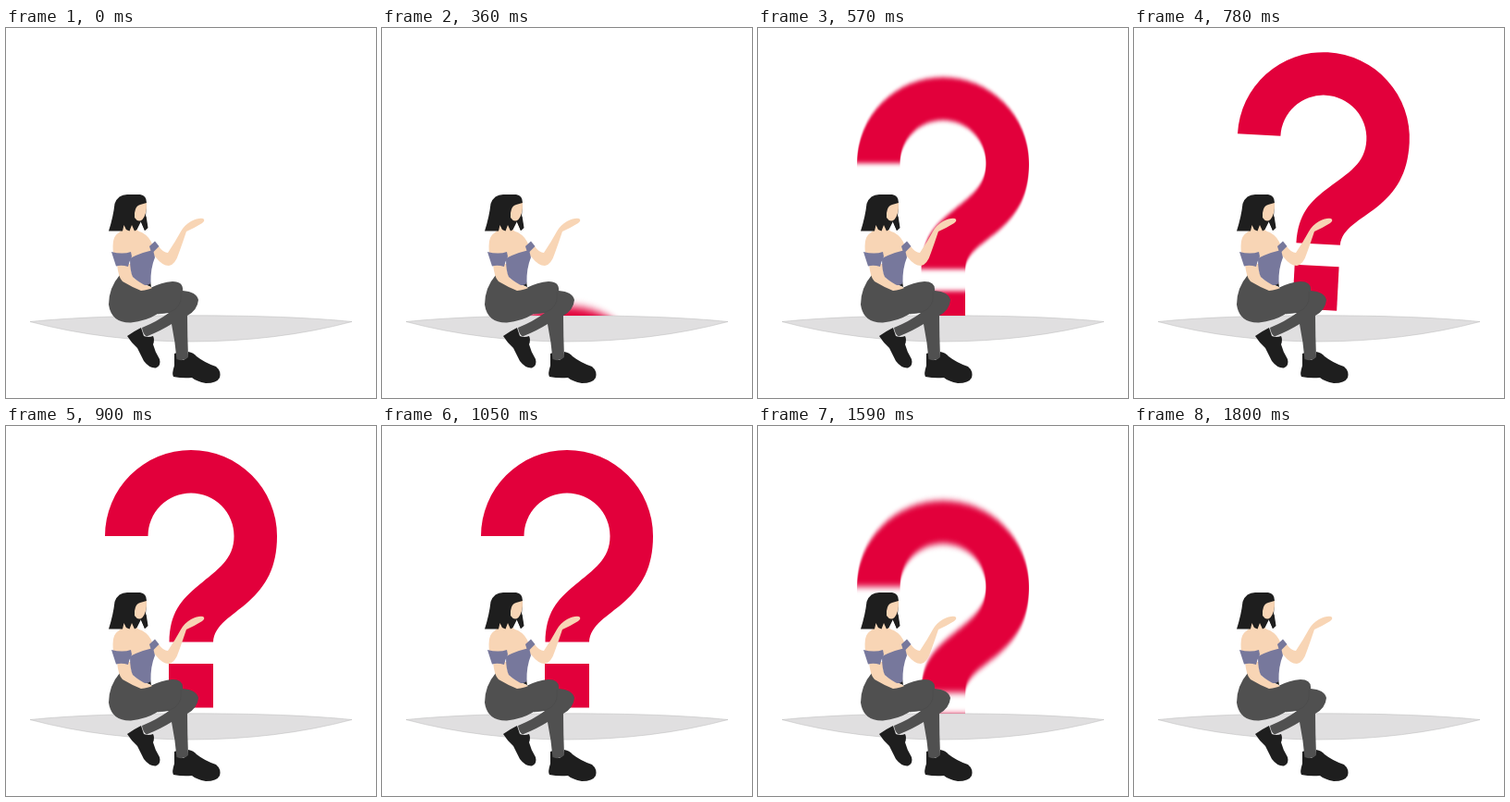
Write an HTML page that moves like this. It is 400 px wide and 400 px high and loops after 2.7 s.

```html
<!DOCTYPE html>
<html lang="en">
<head>
<meta charset="utf-8">
<title>Question</title>
<style>
html, body { margin: 0; width: 100%; height: 100%; overflow: hidden; background: #fff; }
svg { display: block; width: 100%; height: 100%; }
.red { fill: #e2003b; }
.skin { fill: #f8d5b5; }
.top { fill: #77789c; }
.pants { fill: #505050; }
.dark { fill: #1e1e1e; }
</style>
</head>
<body>
<svg viewBox="0 0 400 400">
  <defs>
    <clipPath id="above"><rect width="400" height="311"/></clipPath>
    <filter id="blur" filterUnits="userSpaceOnUse" x="0" y="-20" width="400" height="440" color-interpolation-filters="sRGB">
      <feGaussianBlur id="soft" stdDeviation="0 0"/>
    </filter>
  </defs>

  <path fill="#e0dfe0" stroke="#b8b8b8" stroke-width=".5"
    d="M26 317.5C70 313 130 310.8 200 310.8S330 313 374 317.5C320 332 260 339 200 339S80 332 26 317.5Z"/>

  <g clip-path="url(#above)">
    <g id="lens">
      <g id="mark" class="red">
        <path d="M107 119A93 93 0 0 1 293 119C293 153 281 173 262 190C244 206 225 215 224 233.500H176.500C177 202 189 188 208.500 172C229 155 246.500 144 246.500 119A46.500 46.500 0 0 0 153.500 119Z"/>
        <path d="M176 257H224V304.500H176Z"/>
      </g>
    </g>
  </g>

  <g id="woman">
    <!-- legs and shoes -->
    <path class="dark" d="M131 333Q138 328 146 324L149 333Q154 335 159 333Q161 337 159 342Q161 350 166 358Q168 365 162 367.500Q155 368 149 360Q145 352 142 346Q136 341 131 333Z"/>
    <path class="dark" d="M182 352L185 351Q186 360 191 359Q197 358 197 350Q203 351 206 355Q215 362 227 366Q233 371 231 378Q228 384 216 384Q206 382 201 378Q191 379 181 377Q179 374 182 365Z"/>
    <path class="pants" d="M123 267Q111 281 111 299Q114 319 135 318.500Q151 317 164 309L176 308Q164 317 147 324Q148 331 152 333.500Q168 327 179 320Q183 340 184.500 358Q191 361 197 356Q196 333 196 311Q207 305 208 294Q206 285 191 284Q192 274 180 274Q168 275 156 281Z"/>
    <path fill="none" stroke="#4a4a4a" stroke-width=".6" d="M189 285Q191 297 183 304Q178 308 164 309"/>

    <!-- body -->
    <path class="skin" d="M116 244Q114 226 121 222Q126 219 127 211H138Q139 219 147 221Q156 226 159 236L160 248H118Z"/>
    <path class="skin" d="M120 254Q121 269 126 274Q136 280 146 284Q154 283 158 281Q147 276 139 271Q134 265 135 255Z"/>
    <path class="skin" d="M157 243L165 236Q170 243 175 243Q183 231 189 220Q193 213 200 209Q208 205 213 206Q216 208 212 211Q204 216 195 220Q191 232 187 243Q183 256 176 257Q169 257 162 248Z"/>
    <path class="dark" d="M148 276L156 274L157 280Z"/>
    <path class="top" d="M134 249Q142 245 148 243L159 240L161 248Q156 260 156.500 276Q153 279 149 277.500Q141 273 137 269Q134 263 134 249Z"/>
    <path class="top" d="M114 242Q126 245 135 242L136 247Q133 253 132 258Q125 256 119 257.500Z"/>
    <path class="top" d="M155 236L161 230.500L165.500 236L157.500 244Z"/>

    <!-- head -->
    <path class="dark" d="M111 219.500Q116 204 117.500 190Q121 180 131 180H145Q152 181 152 189L151 204L153 216L150 219L146 209L141.500 218L139 219.500L136 213L133.500 219.500L130 218L127.500 213L126 219.500Z"/>
    <path class="skin" d="M139 200Q140 192 145 191L152 189Q152.500 201 147.500 207Q143 211 139 205Z"/>
    <path class="dark" d="M151.500 203L153.500 216L150 219L145.500 209Q150 207 151.500 203Z"/>
  </g>
</svg>
<script>
const LOOP = 2700, STEP = 30, DEPTH = 290, SWING = 8.5;
const el = id => document.getElementById(id);
const lens = el("lens"), mark = el("mark"), soft = el("soft");
const phase = (t, a, b) => Math.min(1, Math.max(0, (t - a) / (b - a)));
const smooth = p => p * p * (3 - 2 * p);

// How far the mark is sunk below its resting place
function sink(t) {
  return t < 1200
    ? DEPTH * (1 - phase(t, 353, 751)) ** 3
    : DEPTH * phase(t, 1320, 1800) ** 2.9;
}

// One swing to the right, one to the left, then rest
function tilt(t) {
  return SWING * (smooth(phase(t, 750, 825))
    - 2 * smooth(phase(t, 825, 975))
    + smooth(phase(t, 975, 1050)));
}

function draw(t) {
  const y = sink(t);
  const speed = Math.abs(sink(t + 5) - sink(t - 5)) / 10;
  const blur = Math.min(5, speed * 6);
  mark.setAttribute("transform", `translate(0 ${y}) rotate(${tilt(t)} 200 212)`);
  mark.setAttribute("visibility", y < DEPTH ? "visible" : "hidden");
  if (blur > 0.05) {
    soft.setAttribute("stdDeviation", `0 ${blur}`);
    lens.setAttribute("filter", "url(#blur)");
  } else {
    lens.removeAttribute("filter");
  }
}

function tick() {
  const t = performance.now() % LOOP;
  draw(Math.floor(t / STEP) * STEP);
  requestAnimationFrame(tick);
}
tick();
</script>
</body>
</html>
```
